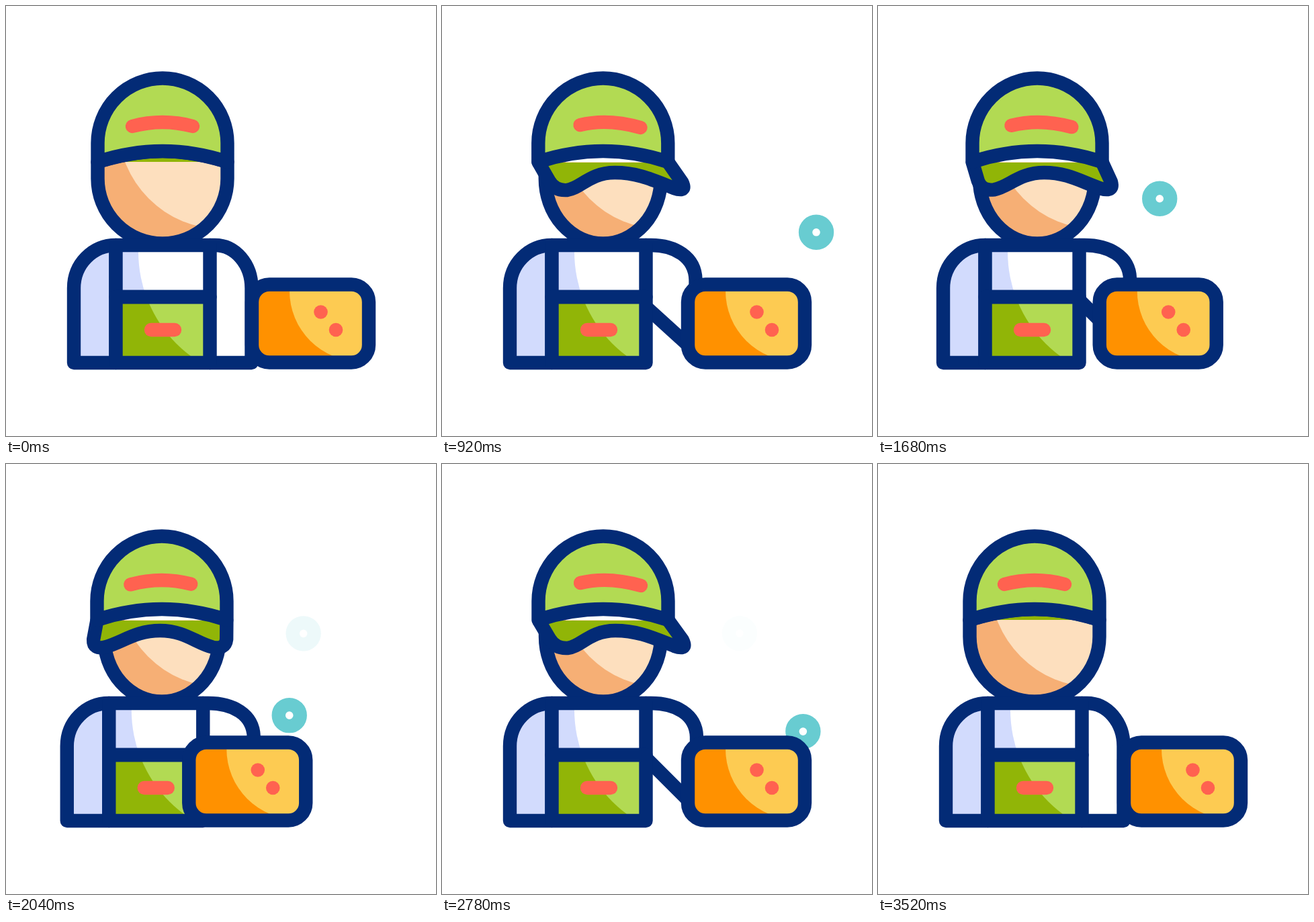
Recreate the animation shown at these times as an HTML page with a canvas. Size 640 px wide and 640 px high, loop 3600 ms.

```html
<!DOCTYPE html>
<html lang="en">
<head>
<meta charset="utf-8">
<title>Worker wiping with a sponge</title>
<style>
html, body { margin: 0; width: 100%; height: 100%; overflow: hidden; background: #fff; }
canvas { display: block; width: 100vmin; height: 100vmin; }
</style>
</head>
<body>
<canvas id="stage" width="640" height="640"></canvas>
<script>
const ctx = document.getElementById('stage').getContext('2d');
const LOOP = 3600, STEP = 20;
const NAVY = '#032b76', LIME = '#b2da53', OLIVE = '#91b507', RED = '#ff6250',
  TEAL = '#68ccd1', LAVENDER = '#d2dbfd', SKIN = '#f6af75', CREAM = '#fddfbe',
  ORANGE = '#ff9100', YELLOW = '#fdcb52', WHITE = '#fff';

const clamp = v => Math.max(0, Math.min(1, v));
const ease = v => (1 - Math.cos(Math.PI * clamp(v))) / 2;
const ramp = (t, start, span) => ease((t - start) / span);
const lerp = (a, b, k) => a + (b - a) * k;
const mix = (a, b, k) => a.map((v, i) => lerp(v, b[i], k));

// Two there-and-back sweeps: 0 -> 1 -> 0 -> 1 -> 0
const sweep = (t, start, half) =>
  (1 - Math.cos(Math.PI * Math.max(0, Math.min(4, (t - start) / half)))) / 2;

// Visor outlines as x,y pairs, left to right
const VISOR_UP = [137,232, 137,232, 142,230, 151,228, 180,220, 205,216, 233,216,
  261,216, 286,220, 315,228, 324,230, 329,232, 329,232];
const VISOR_FRONT = [137,232, 137,264, 137,282, 151,275, 185,257, 205,248, 233,248,
  261,248, 281,257, 315,275, 329,282, 329,264, 329,232];
const VISOR_RIGHT = [144,233, 160,260, 169,275, 187,274, 207,272, 220,248, 258,248,
  292,248, 315,259, 346,271, 366,278, 358,262, 337,233];

function mirror(points) {
  const out = [];
  for (let i = points.length - 2; i >= 0; i -= 2) out.push(466 - points[i], points[i + 1]);
  return out;
}
const VISOR_LEFT = mirror(VISOR_RIGHT);

// Upper arm curve, elbow, then the underside back to the body
const ARM_DOWN = [341,356, 365.5,384, 365.5,420, 365.5,531, 303.5,531];
const ARM_BENT = [347,356, 378,372, 379,406, 379,513, 303.5,437.5];

function paint(path, fill, stroke = NAVY) {
  if (fill) { ctx.fillStyle = fill; ctx.fill(path); }
  if (stroke) { ctx.strokeStyle = stroke; ctx.stroke(path); }
}

function shaded(path, dark, light, x, y, r) {
  ctx.save();
  ctx.clip(path);
  ctx.fillStyle = dark;
  ctx.fillRect(0, 0, 640, 640);
  disc(x, y, r, light);
  ctx.restore();
}

function disc(x, y, r, color) {
  ctx.fillStyle = color;
  ctx.beginPath();
  ctx.arc(x, y, r, 0, 2 * Math.PI);
  ctx.fill();
}

function shifted(dx, draw) {
  ctx.save();
  ctx.translate(dx, 0);
  draw();
  ctx.restore();
}

function bubble(age, path) {
  if (age <= 0 || age >= 1345) return;
  const s = ease(age / 1360);
  const [x, y] = path(s);
  ctx.globalAlpha = Math.min(clamp(age / 320), clamp((1345 - age) / 208));
  ctx.strokeStyle = TEAL;
  ctx.beginPath();
  ctx.arc(x, y, 16, 0, 2 * Math.PI);
  ctx.stroke();
  ctx.globalAlpha = 1;
}
const rightDrift = s => [502 + 95 * s - 30 * s * s, 443 - 59 * s - 105 * s * s];
const innerDrift = s => [494 - 264 * s + 213 * s * s, 491 - 319 * s + 80 * s * s];

function drawFace(lowered) {
  const half = 96.5 - 10.5 * lowered;
  const face = new Path2D();
  face.moveTo(233 - half, 232);
  face.lineTo(233 - half, 257);
  face.ellipse(233, 257, half, 96.5, 0, Math.PI, 0, true);
  face.lineTo(233 + half, 232);
  shaded(face, SKIN, CREAM, 322, 177, 155);
  paint(face);
}

function drawVisor(points) {
  const p = points;
  const visor = new Path2D();
  visor.moveTo(p[0], p[1]);
  visor.lineTo(p[2], p[3]);
  visor.quadraticCurveTo(...p.slice(4, 8));
  visor.bezierCurveTo(...p.slice(8, 14));
  visor.bezierCurveTo(...p.slice(14, 20));
  visor.quadraticCurveTo(...p.slice(20, 24));
  visor.lineTo(p[24], p[25]);
  paint(visor, OLIVE);
}

function drawCap() {
  const cap = new Path2D();
  cap.moveTo(136.5, 232);
  cap.lineTo(136.5, 204);
  cap.arc(233, 204, 96.5, Math.PI, 0);
  cap.lineTo(329.5, 232);
  cap.quadraticCurveTo(233, 200, 136.5, 232);
  cap.closePath();
  paint(cap, LIME);
}

function drawBadge(x, turn) {
  const badge = new Path2D();
  badge.moveTo(x - 45, 179 - 2 * turn);
  badge.quadraticCurveTo(x - 4 * turn, 167, x + 45, 179 + 2 * turn);
  paint(badge, null, RED);
}

function drawHead(t) {
  const lowered = ramp(t, 0, 420) - ramp(t, 3100, 420);
  const facing = ramp(t, 545, 420) - ramp(t, 2860, 420);
  const swing = sweep(t, 965, 422);
  const turn = facing * (1 - 2 * swing);
  const front = mix(VISOR_UP, VISOR_FRONT, lowered);
  const side = mix(VISOR_RIGHT, VISOR_LEFT, swing);

  shifted(7 * turn, () => drawFace(lowered));
  drawVisor(mix(front, side, facing));
  shifted(7 * turn, drawCap);
  drawBadge(233 + 18 * turn, turn);
}

function drawArm(bend) {
  const a = mix(ARM_DOWN, ARM_BENT, bend);
  const arm = new Path2D();
  arm.moveTo(303.5, 356);
  arm.lineTo(311, 356);
  arm.bezierCurveTo(...a.slice(0, 6));
  arm.lineTo(a[6], a[7]);
  arm.lineTo(a[8], a[9]);
  paint(arm, WHITE);
}

function drawBody() {
  const sleeve = new Path2D('M163.5 356C129 356 101 384 101 420V531H163.5Z');
  paint(sleeve, LAVENDER);

  const chest = new Path2D('M163.5 356H303.5V433H163.5Z');
  const apron = new Path2D('M163.5 433H303.5V531H163.5Z');
  shaded(chest, LAVENDER, WHITE, 390, 366, 193);
  shaded(apron, OLIVE, LIME, 390, 366, 193);
  paint(chest);
  paint(apron);
  paint(new Path2D('M216 482H251'), null, RED);
}

function drawSponge() {
  const sponge = new Path2D();
  sponge.roundRect(366, 414.5, 174, 116, 26);
  shaded(sponge, ORANGE, YELLOW, 527, 424, 105);
  disc(468.5, 455.5, 10.3, RED);
  disc(491, 482, 10.3, RED);
  paint(sponge);
}

function draw(t) {
  ctx.fillStyle = WHITE;
  ctx.fillRect(0, 0, 640, 640);
  ctx.lineWidth = 20.4;
  ctx.lineCap = ctx.lineJoin = 'round';

  bubble(t, rightDrift);
  bubble(t - 720, innerDrift);
  bubble(t - 1440, innerDrift);
  bubble(t - 2160, rightDrift);

  const wipe = sweep(t, 1010, 400);
  const bend = ramp(t, 590, 420) - ramp(t, 2860, 420);
  drawHead(t);
  shifted(-16.6 * wipe, () => {
    drawArm(bend);
    drawBody();
  });
  shifted(-152 * wipe, drawSponge);
}

function tick() {
  const t = performance.now() % LOOP;
  draw(Math.min(3520, Math.floor(t / STEP) * STEP));
  requestAnimationFrame(tick);
}
tick();
</script>
</body>
</html>
```
